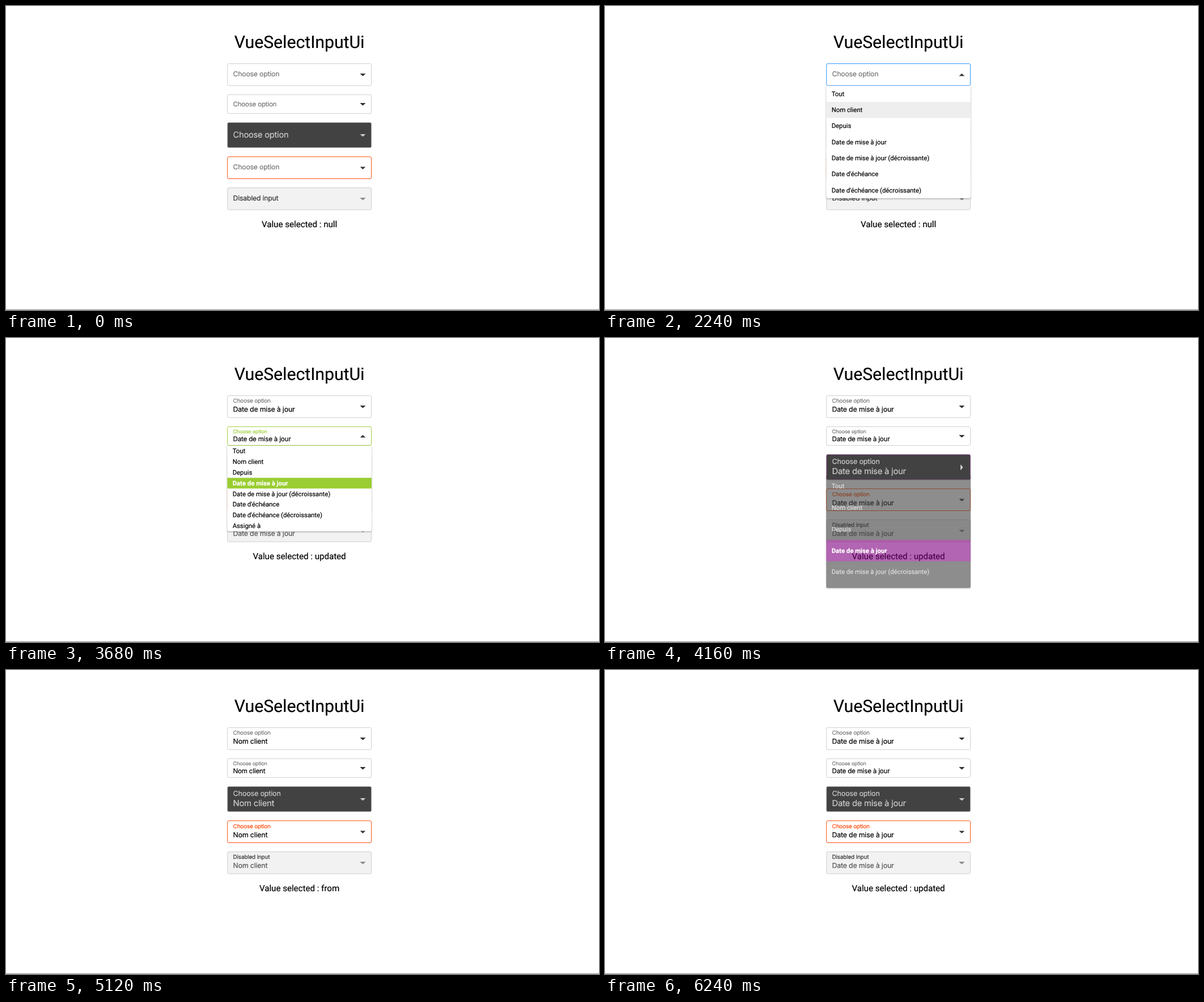
Animation of 1046x536 px, one loop 7360 ms. Source, as an HTML page:

```html
<!DOCTYPE html>
<html lang="en">
<head>
<meta charset="utf-8">
<title>VueSelectInputUi</title>
<style>
html, body { margin: 0; width: 100%; height: 100%; overflow: hidden; background: #fff; }
#stage { position: relative; width: 1046px; height: 536px; overflow: hidden; }
#stage div { position: absolute; box-sizing: border-box; white-space: nowrap; }
#form {
  left: 0; top: 0; width: 270px; height: 400px;
  transform-origin: 0 0; transform: translate(390.2px, 101.2px) scale(.9434);
  font-family: Roboto, "Liberation Sans", sans-serif; color: #000;
  text-rendering: geometricPrecision; -webkit-text-stroke: .2px;
}
.heading { left: 0; width: 100%; text-align: center; line-height: 0; }
.title { top: -40px; font-size: 32px; }
.result { top: 301px; font-size: 16px; }
.rule { left: 0; top: 535px; width: 100%; height: 1px; background: #8a8a8a; }
.field { left: 0; width: 100%; border: 1px solid; border-radius: 3px; }
.label, .value {
  left: 11px; line-height: 0; letter-spacing: -.013em;
  font-family: Inter, "Liberation Sans", sans-serif;
}
.arrow {
  left: 248px; width: 11px; height: 5px;
  clip-path: polygon(0 0, 100% 0, 50% 100%);
}
#stage .list {
  left: 0; width: 100%; overflow: hidden; border-radius: 0 0 3px 3px;
  box-shadow: 0 1px 3px rgba(0, 0, 0, .35);
}
.rows { left: 0; top: 0; width: 100%; }
#stage .row { position: relative; padding-left: 10px; font-size: 12px; }
.thumb { right: 2px; width: 7px; height: 134px; border-radius: 4px; background: rgba(255, 255, 255, .5); }
</style>
</head>
<body>
<div id="stage">
  <div id="form">
    <div class="heading title">VueSelectInputUi</div>
    <div class="heading result"></div>
  </div>
  <div class="rule"></div>
</div>
<script>
const LOOP = 7360;
const STEP = 160;
const LIST_MAX = 210;
const OPTIONS = ["Tout", "Nom client", "Depuis", "Date de mise à jour",
  "Date de mise à jour (décroissante)", "Date d'échéance",
  "Date d'échéance (décroissante)", "Assigné à"];
const KEYS = { 1: "from", 3: "updated" };

// big/small/value: font sizes; up/down: offsets of the floated label and the value
const base = {
  height: 42, bg: "#fff", border: "#cccccc", ink: "#757575", text: "#000", arrow: "#333",
  hover: "#eeeeee", big: 12.9, small: 10.46, value: 13.04, up: -10, down: 6, label: "Choose option"
};
const FIELDS = [
  { top: 0, focus: "#1e90ff", mark: "#1e90ff", row: 30 },
  { top: 58, height: 36, focus: "#9acd32", mark: "#9acd32", row: 20,
    big: 12.1, small: 9.5, value: 12.2, up: -7, down: 5.5 },
  { top: 110, height: 48, focus: "#800080", mark: "#800080", row: 40,
    bg: "#424242", border: "#b0b0b0", ink: "#cccccc", text: "#ccc", arrow: "#ccc", hover: "#333",
    big: 15.45, small: 13.27, value: 15.6, down: 8 },
  { top: 174, border: "#ff4500", focus: "#ff4500", floatInk: "#ff4500", mark: "#1e90ff", row: 50 },
  { top: 232, bg: "#f2f2f2", ink: "#333", text: "#555", arrow: "#8c8c8c", label: "Disabled input" }
].map(f => ({ ...base, ...f }));

// Each entry changes part of the state and holds until the next one.
const TIMELINE = [
  [0, { active: 0, open: 0, pick: -1, hover: -1, float: 0, scroll: 0 }],
  [1440, { open: .6, hover: 0 }],
  [1600, { open: 1 }],
  [2240, { hover: 1 }],
  [2560, { open: .4, pick: 1, float: .5 }],
  [2720, { open: 0, float: 1, hover: -1 }],
  [3040, { active: 1, open: .6 }],
  [3200, { open: 1 }],
  [3360, { hover: 2 }],
  [3520, { hover: 3 }],
  [3680, { pick: 3 }],
  [3840, { open: .4 }],
  [4000, { open: 0, hover: -1 }],
  [4160, { active: 2, open: .6 }],
  [4320, { open: 1 }],
  [4480, { hover: 0 }],
  [4640, { hover: 1, scroll: 5 }],
  [4800, { scroll: 10 }],
  [4960, { open: .4, pick: 1 }],
  [5120, { open: 0, hover: -1, scroll: 0 }],
  [5600, { active: 3, open: .98 }],
  [5760, { open: 1 }],
  [5920, { hover: 3 }],
  [6080, { open: .4, pick: 3 }],
  [6240, { open: 0, hover: -1 }]
];

const form = document.getElementById("form");
const result = document.querySelector(".result");

function add(cls, parent = form, css = {}) {
  const el = document.createElement("div");
  el.className = cls;
  setStyle(el, css);
  return parent.appendChild(el);
}
function setStyle(el, css) { Object.assign(el.style, css); }
const px = n => n + "px";
const mix = (a, b, k) => a + (b - a) * k;
function blend(a, b, k) {
  const part = (c, i) => parseInt(c.slice(i, i + 2), 16);
  return `rgb(${[1, 3, 5].map(i => Math.round(mix(part(a, i), part(b, i), k)))})`;
}

for (const f of FIELDS) {
  f.y = f.top + f.height / 2;
  f.box = add("field", form, { top: px(f.top), height: px(f.height), background: f.bg });
  f.labelEl = add("label");
  f.labelEl.textContent = f.label;
  f.valueEl = add("value", form, { top: px(f.y + f.down), fontSize: px(f.value), color: f.text });
  f.arrowEl = add("arrow", form, { top: px(f.y - 2), background: f.arrow });
}
const list = add("list");
const rows = add("rows", list);
const rowEls = OPTIONS.map(text => {
  const el = add("row", rows);
  el.textContent = text;
  return el;
});
const thumb = add("thumb", list);

function stateAt(time) {
  const state = {};
  for (const [start, change] of TIMELINE) {
    if (start > time) break;
    Object.assign(state, change);
  }
  return state;
}

function drawField(f, s, open) {
  const turn = Math.round(open * 2) / 2;
  const floatInk = f.floatInk || (turn === 1 ? f.focus : f.ink);
  f.box.style.borderColor = turn ? blend(f.border, f.focus, turn) : f.border;
  setStyle(f.labelEl, {
    top: px(f.y + f.up * s.float),
    fontSize: px(mix(f.big, f.small, s.float)),
    color: s.float === 1 ? floatInk : f.ink
  });
  f.valueEl.textContent = OPTIONS[s.pick] || "";
  f.valueEl.style.opacity = s.float;
  f.arrowEl.style.transform = `rotate(${-180 * turn}deg)`;
}

function drawList(f, s) {
  list.style.display = s.open ? "block" : "none";
  if (!s.open) return;
  setStyle(list, {
    top: px(f.top + f.height),
    height: px(Math.min(LIST_MAX, f.row * OPTIONS.length)),
    background: f.bg,
    opacity: s.open,
    transform: `translateY(${-20 * (1 - s.open)}px)`
  });
  rows.style.top = px(-s.scroll);
  rowEls.forEach((el, i) => {
    const picked = i === s.pick;
    setStyle(el, {
      height: px(f.row),
      lineHeight: px(f.row),
      background: picked ? f.mark : i === s.hover ? f.hover : "transparent",
      color: picked ? "#fff" : f.text,
      fontWeight: picked ? 700 : 400
    });
  });
  setStyle(thumb, { display: s.scroll ? "block" : "none", top: px(1 + s.scroll * .6) });
}

let shown = -1;
function tick() {
  const step = Math.floor((performance.now() % LOOP) / STEP);
  if (step !== shown) {
    shown = step;
    const s = stateAt(step * STEP);
    FIELDS.forEach((f, i) => drawField(f, s, i === s.active ? s.open : 0));
    drawList(FIELDS[s.active], s);
    result.textContent = "Value selected : " + (KEYS[s.pick] || "null");
  }
  requestAnimationFrame(tick);
}
tick();
</script>
</body>
</html>
```
